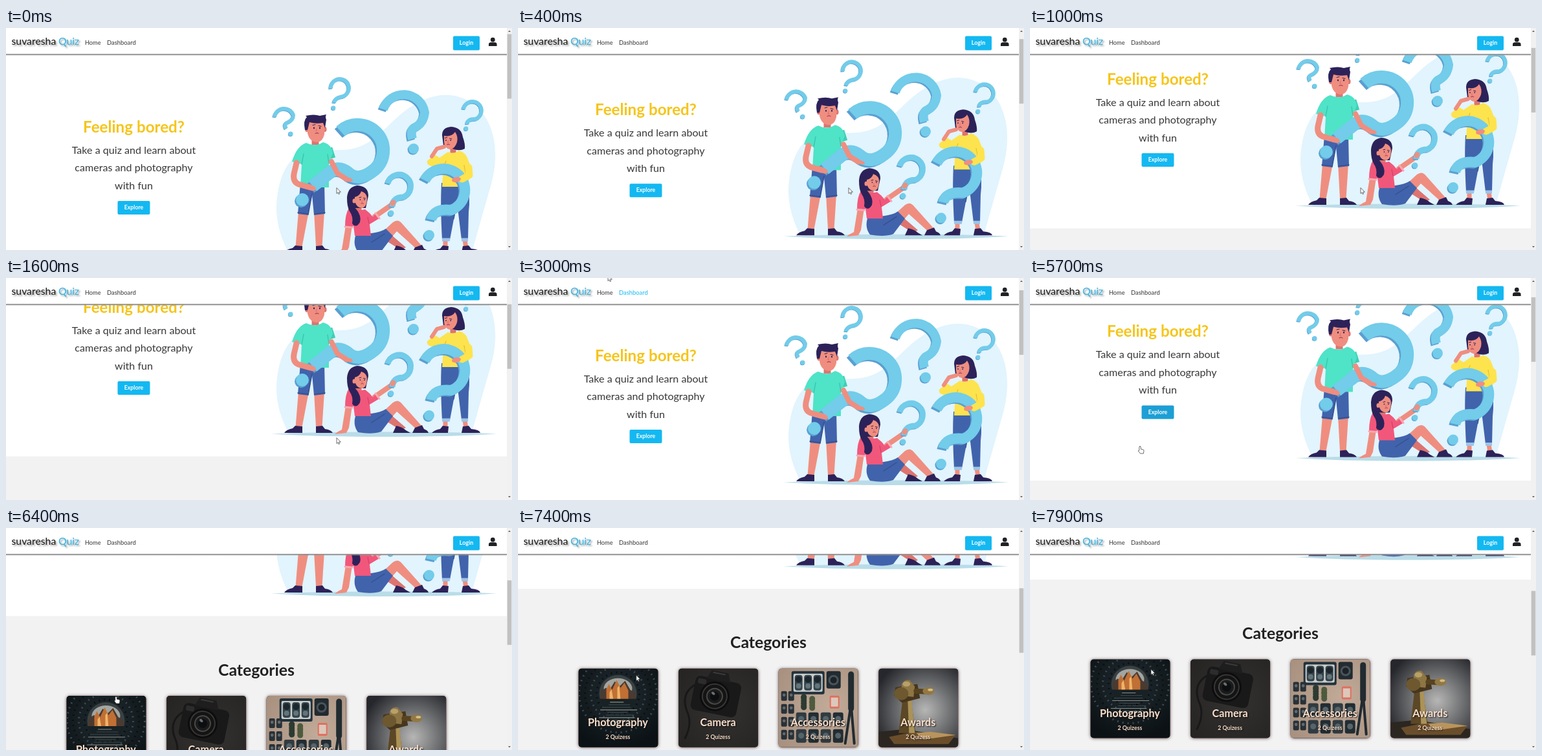
An HTML page with a canvas that plays this animation: 782x344 px, repeating every 8 s.

```html
<!DOCTYPE html>
<html lang="en">
<head>
<meta charset="utf-8">
<title>Quiz home page</title>
<style>
html, body { margin: 0; width: 100%; height: 100%; overflow: hidden; background: #fff; }
canvas { display: block; width: 782px; height: 344px; }
</style>
</head>
<body>
<canvas id="stage"></canvas>
<script>
const W = 782, H = 344, LOOP = 8000, STEP = 100;
const canvas = document.getElementById('stage');
const ratio = window.devicePixelRatio || 1;
canvas.width = W * ratio;
canvas.height = H * ratio;
const c = canvas.getContext('2d');

const SKIN = '#ef8e80', SKIN_DARK = '#dd7470', NAVY = '#2c2259', BLUE = '#4163ac';
const CYAN = '#14b8f1', MARK = '#72ccea', MARK_SIDE = '#5a9fd0', GREY = '#f2f2f2';

// Key rows are [time, value, value...]
const scrollKeys = [[0, 0], [600, 40], [700, 40], [1000, 74], [1600, 108], [1700, 108],
  [2100, 33], [5400, 33], [6000, 108], [6100, 108], [6400, 248], [6500, 256], [6700, 256],
  [7600, 300], [7900, 304.5]];
const cursorKeys = [[2200, 511, 248], [2800, 230, 60], [2900, 178, 24], [3000, 139, -4],
  [3100, 132, -14], [3300, 140, -14], [4000, 178, 170], [4300, 186, 240], [4700, 168, 261],
  [6700, 168, 261], [7600, 187, 219]];

function track(keys, t) {
  if (t <= keys[0][0]) return keys[0].slice(1);
  for (let i = 1; i < keys.length; i++) {
    const a = keys[i - 1], b = keys[i];
    if (t <= b[0]) {
      const k = (t - a[0]) / (b[0] - a[0]);
      return a.slice(1).map((v, j) => v + (b[j + 1] - v) * k);
    }
  }
  return keys[keys.length - 1].slice(1);
}

function fill(color, d) {
  c.fillStyle = color;
  c.fill(new Path2D(d));
}
function line(color, w, d, cap = 'round') {
  c.strokeStyle = color;
  c.lineWidth = w;
  c.lineCap = cap;
  c.lineJoin = 'round';
  c.stroke(new Path2D(d));
}
function oval(color, x, y, rx, ry = rx, turn = 0) {
  c.fillStyle = color;
  c.beginPath();
  c.ellipse(x, y, rx, ry, turn, 0, Math.PI * 2);
  c.fill();
}
function rect(color, x, y, w, h, r = 0) {
  c.fillStyle = color;
  c.beginPath();
  c.roundRect(x, y, w, h, r);
  c.fill();
}
function text(str, x, y, size, color, weight = 400, align = 'center') {
  c.font = `${weight} ${size}px Lato, "Open Sans", sans-serif`;
  c.textAlign = align;
  c.fillStyle = color;
  c.fillText(str, x, y);
}
function shadow(color, blur, x = 0, y = 0) {
  c.shadowColor = color;
  c.shadowBlur = blur * ratio;
  c.shadowOffsetX = x * ratio;
  c.shadowOffsetY = y * ratio;
}
const noShadow = () => shadow('transparent', 0);

function mark(w, d, x, y, r) {
  const off = w * 0.16;
  c.save();
  c.translate(-off, off);
  line(MARK_SIDE, w * 0.9, d, 'butt');
  oval(MARK_SIDE, x + off * 0.4, y - off * 0.3, r);
  c.restore();
  line(MARK, w, d, 'butt');
  oval(MARK, x, y, r);
}

function face(x, y, s) {
  for (const [dx, tilt] of [[-5, -1], [4, 1]]) {
    oval(NAVY, x + dx * s, y, 1.1 * s, 1.4 * s);
    line(NAVY, 1, `M${x + (dx - 2) * s} ${y - (4 - tilt * 0.4) * s}l${4 * s} ${tilt * s}`);
  }
  line(SKIN_DARK, 1.1, `M${x - s} ${y + s}l${-s} ${4 * s}h${2 * s}`);
  line('#a8405a', 1.1, `M${x - 3 * s} ${y + 8.5 * s}q${2.5 * s} ${-1.8 * s} ${5 * s} 0`);
}

function man() {
  fill(SKIN, 'M452 284H468L457.5 339H447.5Z');
  fill(SKIN, 'M476 284H492L488.5 339H479Z');
  fill(BLUE, 'M455 240H492L493 288L476 290L473 258L467 290L451 288Z');
  line('#35508f', 1.5, 'M473 256L467 289M451 286L467 288M477 288L493 286');
  fill(NAVY, 'M447 337L458 338L458 348H430Q433 343 443 341Z');
  fill(NAVY, 'M479 338L489 337L493 342Q502 343 505 348H479Z');
  line(SKIN_DARK, 11, 'M478 168V181', 'butt');
  line('#3fcfb4', 17, 'M496 187L501 203', 'butt');
  fill('#4fe3c8', 'M464 178Q478 185 490 177Q503 180 505 194L499 210V247H455L457 211L442 207Q449 183 464 178Z');
  line('#38c4ab', 1.3, 'M457 211L460 195M499 210L497 196');
  oval(SKIN_DARK, 465, 157, 3, 4);
  oval(SKIN_DARK, 493, 157, 2.5, 4);
  fill(SKIN, 'M465 145Q478 138 493 145L492 165Q489 177 480 177Q469 176 466 163Z');
  fill(NAVY, 'M462 158Q459 143 465 138L463 136Q476 133 485 136L495 134Q493 138 495 142L493 155L490 147Q478 149 469 146L466 158Z');
  face(481, 155, 1);
  mark(20, 'M517 160A38 38 0 1 1 570 219Q545 240 528 224Q515 214 503 222L474 245', 458, 266, 10);
  line(SKIN, 9, 'M449 209L445 226Q443 238 452 242L470 247');
  oval(SKIN, 473, 248, 6, 4, 0.4);
  line(SKIN, 8, 'M503 207L512 225L526 234');
  oval(SKIN, 530, 235, 6, 3, 0.2);
}

function sitter() {
  fill(SKIN_DARK, 'M566 332L588 317L596 321L618 340L610 344L588 330L572 342Z');
  fill(NAVY, 'M603 337Q613 339 618 344L625 348H598Z');
  fill(SKIN, 'M572 325L598 301Q606 295 612 303L644 339L635 343L604 315L582 340Z');
  fill(NAVY, 'M632 340L643 336L646 342Q652 344 653 348H628Z');
  fill(BLUE, 'M541 319L565 318Q580 316 587 311L598 322L580 346Q566 351 544 347Q535 335 541 319Z');
  line('#35508f', 1.4, 'M565 332L585 319');
  fill(SKIN, 'M525 306H535L530 340L526 348L508 350Q512 346 519 343Z');
  line(SKIN_DARK, 9, 'M545 272V284', 'butt');
  line(SKIN, 8, 'M570 292L583 283L596 274');
  fill('#f1577b', 'M530 279Q544 284 555 281Q562 286 567 293L572 287L577 295L567 301L562 304L564 322H539L537 306L535 309L524 308Q524 288 530 279Z');
  line('#f8a7b5', 3, 'M524 308L535 309M571 287L577 295');
  line('#cf3f6b', 1.2, 'M537 306L540 295M561 303L559 293');
  fill(NAVY, 'M527 263Q528 246 543 244Q560 245 560 260L556 279H540Q550 291 547 301Q541 311 535 303Q537 292 531 284Q527 277 527 263Z');
  fill(SKIN, 'M539 262Q547 260 549 253Q558 256 558 264Q558 277 551 279Q541 279 539 267Z');
  oval(SKIN, 538, 268, 2.5, 3.5);
  face(551, 266, 0.72);
  mark(9, 'M590 241A18 18 0 1 1 614 262Q598 262 597 277', 595, 287, 4.5);
  oval(SKIN, 598, 271, 4, 5, 0.5);
}

function woman() {
  line(SKIN, 7, 'M679 328V341M709 328L711 341', 'butt');
  fill(BLUE, 'M673 240H713Q718 262 715 285L714 328H704L697 270L686 328H674Q671 275 673 240Z');
  line('#9cc4e8', 5, 'M674 328H686M704 328H714', 'butt');
  line('#35508f', 1.2, 'M697 270L692 296');
  fill(NAVY, 'M675 337L684 338L683 348H658Q663 343 671 342Z');
  fill(NAVY, 'M706 338L715 337L719 342Q732 343 733 348H704Z');
  line(SKIN_DARK, 9, 'M691 180V196', 'butt');
  fill(NAVY, 'M674 166Q674 154 688 153Q704 154 706 169Q710 180 709 187Q702 191 693 188L676 182Z');
  fill('#fde34e', 'M683 192Q692 196 700 190Q711 193 714 204L720 220L716 232L713 246H674L676 216L657 214Q649 211 651 206L662 196L670 201Z');
  line('#e5bf35', 1.3, 'M676 216L680 206M712 232L708 213');
  fill(SKIN, 'M677 167Q689 169 694 161Q699 168 697 177Q694 187 686 188Q677 186 677 176Z');
  face(684, 174, 0.8);
  line(SKIN, 6, 'M658 199L666 187L677 184');
  mark(16, 'M647 236A33 33 0 1 1 688 282Q661 279 657 297', 654, 321, 8);
  line('#fde34e', 11, 'M715 216L716 228L705 234');
  oval(SKIN, 696, 235, 7, 4, -0.2);
}

function artwork() {
  fill('#e2f4fd', 'M438 351Q417 312 418 275C421 220 444 183 490 188C553 195 566 174 604 139C640 106 683 92 718 115C754 138 765 190 749 245Q736 290 719 351Z');
  fill('#b9dce8', 'M410 349.5Q500 346 583 346.5Q690 346 758 349.5Q690 354 583 354Q480 354 410 349.5Z');
  mark(6, 'M415 138A15 15 0 0 1 444 135Q444 143 434 147Q429 149 433 156', 440, 164, 3.6);
  mark(6, 'M502 94A14 14 0 1 1 521 106Q508 108 507 116', 506, 124, 3.4);
  mark(14, 'M583 126A33 33 0 0 1 647 131Q645 148 632 154Q624 158 628 172', 630, 187, 8);
  mark(6, 'M707 126A14 14 0 1 1 726 141Q712 141 713 149', 711, 156, 3.4);
  man();
  woman();
  sitter();
}

function glow(x, y, r, inner, outer) {
  const g = c.createRadialGradient(x, y, 0, x, y, r);
  g.addColorStop(0, inner);
  g.addColorStop(1, outer);
  rect(g, 0, 0, 123, 122);
}

// Each photo is drawn in a 123 x 122 box
const photos = [
  () => {
    glow(61, 40, 85, '#222d32', '#0b1114');
    for (let i = 0; i < 4; i++) {
      c.strokeStyle = i % 2 ? '#3c4a50' : '#0a0f12';
      c.lineWidth = 3;
      c.setLineDash([2, 6]);
      c.beginPath();
      c.arc(61, 39, 33 + i * 9, 0, Math.PI * 2);
      c.stroke();
    }
    c.setLineDash([]);
    oval('#3a4143', 61, 39, 29);
    oval('#a2a5a0', 61, 31, 22, 16);
    fill('#4a3a30', 'M34 50V36L42 30L48 33L56 20L64 27L72 19L80 33L88 38V50Z');
    fill('#c06f35', 'M43 49V32L47 24L52 33L59 18L65 30L71 22L77 34V49Z');
    fill('#f0b468', 'M48 49V37L51 32L54 49ZM60 49V30L63 26L65 49Z');
    fill('#182124', 'M32 47H90Q83 67 61 68Q40 67 32 47Z');
    for (let i = 0; i < 10; i++) {
      const w = 12 + i * 7 % 22;
      line(i % 3 ? '#39474c' : '#8b8d88', 1.2, `M${61 - w + i * 5 % 9} ${52 + i * 4}h${w * 1.7}`);
    }
  },
  () => {
    glow(70, 60, 95, '#343231', '#242322');
    c.save();
    c.translate(56, 42);
    c.rotate(0.2);
    rect('#191919', -34, -26, 72, 54, 8);
    fill('#1e1e1e', 'M-18 -24L-12 -38H14L20 -24Z');
    rect('#3b3a39', -10, -36, 20, 2, 1);
    rect('#2c2c2c', -30, -22, 13, 8, 2);
    [['#0d0d0d', 23], ['#383736', 20], ['#141414', 18], ['#4a4947', 13], ['#1a1b1c', 11], ['#0d0e0f', 7]]
      .forEach(([color, r]) => oval(color, 0, 1, r));
    oval('#6b7072', -3, -3, 3, 2, 0.5);
    c.restore();
    line('#181818', 3, 'M24 26Q3 40 13 66Q22 85 10 108');
  },
  () => {
    glow(80, 60, 95, '#c2aa99', '#a8917f');
    rect('#22323c', 20, 4, 51, 36, 3);
    rect('#c9cdca', 23, 8, 45, 28, 2);
    for (let i = 0; i < 3; i++) {
      rect('#34434b', 25 + i * 14.5, 10, 12, 24, 4);
      oval('#1c272d', 31 + i * 14.5, 17, 5);
      oval('#63747b', 31 + i * 14.5, 27, 4);
    }
    for (let i = 0; i < 8; i++) {
      const x = 4 + i % 2 * 11, y = 35 + Math.floor(i / 2) * 20;
      rect('#273138', x, y, 9, 15, 2);
      oval('#62696b', x + 4.5, y + 6, 2.4);
    }
    rect('#212b31', 74, 4, 22, 27, 3);
    oval('#495359', 85, 18, 8);
    oval('#1b2328', 85, 18, 5);
    line('#212b31', 9, 'M112 9V62');
    line('#212b31', 4, 'M112 55L103 116M112 55L117 116');
    rect('#e0705f', 79, 42, 15, 20, 2);
    rect('#dcc8bb', 81, 45, 11, 14);
    for (let i = 0; i < 11; i++) oval(i % 2 ? '#4d5a3d' : '#2c3b32', 39 + i * 13 % 26, 44 + i * 7 % 18, 4.5);
    for (let i = 0; i < 8; i++) {
      const x = 27 + i % 4 * 19, y = 68 + Math.floor(i / 4) * 26;
      rect(i % 2 ? '#222d33' : '#303b41', x, y, 16, 21, 3);
      oval('#56646a', x + 8, y + 10, 4.5);
    }
  },
  () => {
    glow(72, 64, 82, '#b6b6b5', '#25272c');
    fill('#2c2620', 'M0 98L40 94L123 108V122H0Z');
    fill('#6a4e2c', 'M16 106L55 98L119 103L108 117H24Z');
    fill('#b9955c', 'M58 100L80 98L119 103L70 110Z');
    fill('#5c4726', 'M37 48L50 49L57 100H31Z');
    fill('#ab9258', 'M45 49L51 50L56 100H47Z');
    fill('#46361e', 'M26 29L60 24L64 46L36 53L24 42Z');
    fill('#8d7544', 'M36 24Q40 16 48 18L56 28L54 44L34 42Z');
    oval('#6d5830', 35, 39, 11, 10);
    oval('#b7a069', 43, 24, 6, 4);
    line('#57431f', 8, 'M58 35L78 36');
    oval('#927844', 77, 35, 9, 6);
    oval('#d0bc83', 80, 33, 4, 2);
  }
];

function card(i) {
  const names = ['Photography', 'Camera', 'Accessories', 'Awards'];
  c.save();
  c.translate(93.5 + i * 154.6, 508);
  shadow('#6d5054', 5, 0, 0.5);
  rect('#333', 0, 0, 123, 122, 5);
  noShadow();
  c.save();
  c.beginPath();
  c.roundRect(0, 0, 123, 122, 5);
  c.clip();
  photos[i]();
  c.restore();
  shadow('rgba(0,0,0,.8)', 2, 1, 1);
  text(names[i], 61, 89, 16.2, '#fce0cc', 700);
  text('2 Quizess', 61, 109, 8.8, '#fce0cc', 700);
  noShadow();
  c.restore();
}

function page(scroll, t) {
  c.save();
  c.translate(0, -scroll);
  rect('#fff', 0, 0, 774, 384.5);
  text('Feeling bored?', 197.5, 161.5, 24.2, '#f5c51b', 700);
  ['Take a quiz and learn about', 'cameras and photography', 'with fun']
    .forEach((s, i) => text(s, 197.5, 194.5 + i * 27.7, 16.1, '#383838'));
  rect(t >= 4300 && t < 6500 ? '#1c9fd5' : CYAN, 172.5, 268, 50, 21, 2);
  text('Explore', 197.5, 281, 8.7, '#fff', 700);
  artwork();
  if (scroll > 100) {
    text('Categories', 387, 476.5, 24.8, '#212121', 700);
    photos.forEach((_, i) => card(i));
  }
  c.restore();
}

function header(t) {
  rect('#fff', 0, 0, 774, 40);
  const g = c.createLinearGradient(0, 40, 0, 43);
  g.addColorStop(0, '#a0a0a0');
  g.addColorStop(0.4, '#8e8e8e');
  g.addColorStop(1, 'rgba(160,160,160,0)');
  rect(g, 0, 40, 774, 3);
  shadow('rgba(0,0,0,.4)', 2.5, 2, 2);
  text('suvaresha', 8.5, 26, 15.8, '#171717', 400, 'left');
  text('Quiz', 81, 26, 15.8, '#2fb3e6', 400, 'left');
  noShadow();
  text('Home', 122, 26, 9.2, '#333', 400, 'left');
  text('Dashboard', 156, 26, 9.4, t >= 2900 && t < 3200 ? CYAN : '#333', 400, 'left');
  rect(CYAN, 691, 12.5, 41, 22, 2);
  text('Login', 711.5, 26, 8.9, '#fff', 700);
  oval('#202124', 752.3, 18.2, 3.4);
  fill('#202124', 'M746 28V25.5Q746 22.2 749.4 22.2H755.2Q758.6 22.2 758.6 25.5V28Z');
}

function scrollbar(scroll) {
  rect('#f1f1f1', 774, 0, 8, H);
  rect('#c1c1c1', 774.7, 9.5 + scroll * 0.289, 6.6, 100);
  fill('#606060', 'M776 6L778 3.8L780 6ZM776 338L778 340.2L780 338Z');
}

function cursor(t) {
  const [x, y] = track(cursorKeys, t);
  const hand = t >= 4300 && t < 6800;
  const shape = hand
    ? 'M2 0Q3.4 0 3.4 1.4V4.2L7 5Q8.3 5.3 8 7L7.3 11H2.5L-.6 7.2Q-1 6 .8 6.3V1.2Q.8 0 2 0Z'
    : 'M0 0V8.5L1.9 6.8L3.2 9.6L4.6 9L3.4 6.2H6Z';
  c.save();
  c.translate(x, y);
  fill('#fff', shape);
  line('#333', 0.7, shape);
  c.restore();
}

function draw(now) {
  const t = Math.floor(now % LOOP / STEP) * STEP;
  const [scroll] = track(scrollKeys, t);
  c.setTransform(ratio, 0, 0, ratio, 0, 0);
  rect(GREY, 0, 0, W, H);
  page(scroll, t);
  header(t);
  scrollbar(scroll);
  cursor(t);
}

const start = performance.now();
function tick() {
  draw(performance.now() - start);
  requestAnimationFrame(tick);
}
tick();
</script>
</body>
</html>
```
